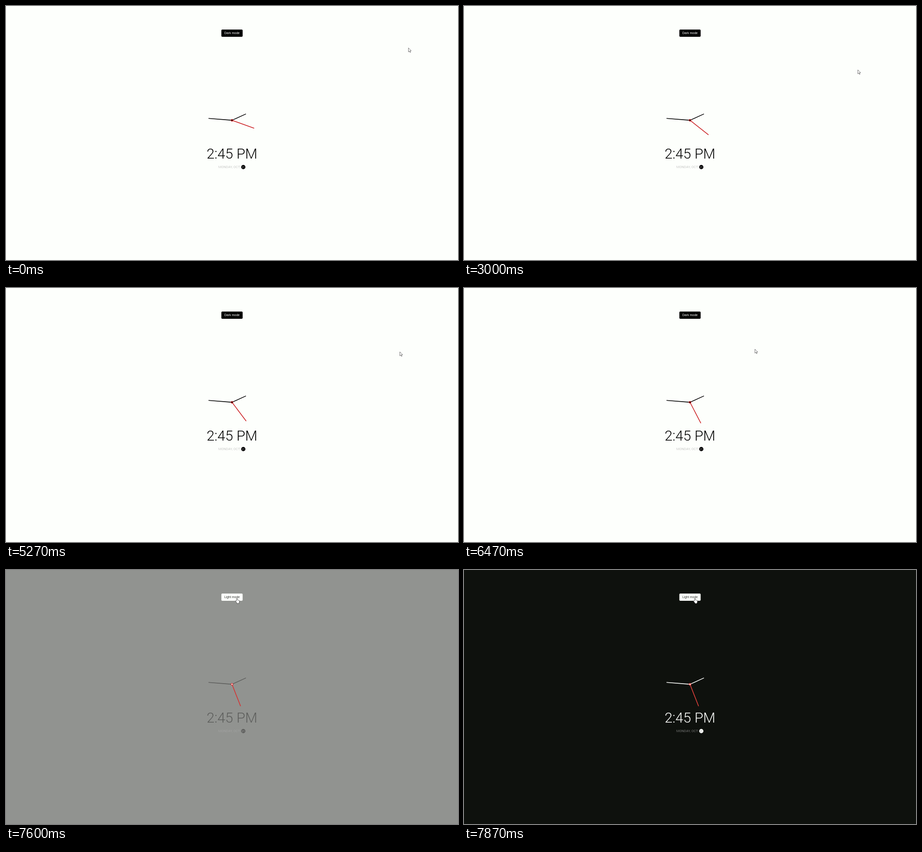
Recreate the animation shown at these times as an HTML page. Size 998 px wide and 561 px high, loop 8000 ms.

```html
<!DOCTYPE html>
<html lang="en">
<head>
<meta charset="utf-8">
<title>Theme clock</title>
<style>
html, body { margin: 0; width: 100%; height: 100%; overflow: hidden; }
svg { display: block; width: 998px; height: 561px; }
text { font-family: Roboto, sans-serif; font-weight: 300; }
#label { font: 6.93px "Liberation Sans", Arial, sans-serif; }
line { stroke-width: 1.56; }
#arrow, #hand { fill: #fff; stroke: #222; stroke-linejoin: round; }
</style>
</head>
<body>
<svg viewBox="0 0 998 561">
  <rect id="page" width="998" height="561"/>
  <rect id="button" x="475.5" y="52" width="47" height="16.1" rx="2.1"/>
  <text id="label" x="499" y="62.3" text-anchor="middle"></text>
  <g transform="translate(499 252.4)">
    <line id="hour" y2="-33.8"/>
    <line id="minute" y2="-52"/>
    <line id="second" y2="-52"/>
    <circle id="hub" r="2.6"/>
    <circle id="pin" r="1.3"/>
  </g>
  <text id="time" x="499" y="337.4" font-size="31.2" text-anchor="middle">2:45 PM</text>
  <text x="469" y="358.3" font-size="7.28" letter-spacing=".156" fill="#aaa">MONDAY, OCT</text>
  <circle id="badge" cx="523.9" cy="355.8" r="4.7"/>
  <text id="day" x="524" y="358" font-size="6.24" letter-spacing=".156" text-anchor="middle">21</text>
  <path id="arrow" stroke-width="1.2" d="M0 0V17L4 13.3 6.8 19.4 9.3 18.3 6.5 12.3H12Z"/>
  <path id="hand" stroke-width="1.3" d="M5 11V2Q5 0 6.7 0T8.4 2V7Q10 6 11.2 7.6 13 6.8 14 8.4 17 8 17 11V15Q17 18 15 20V22H7V20Q4 17 1 12.5 0 10.5 1.6 10 3 9.6 5 12"/>
</svg>
<script>
const $ = id => document.getElementById(id);
const LOOP = 8000, FRAME = 1000 / 15, FADE = 500;
const PAGE_FADE = 7290, INK_FADE = 7325;
const LIGHT = [253, 255, 252], DARK = [14, 17, 13], BLACK = [0, 0, 0];

// Cursor stops: time, x, y, easing used on the way there
const smooth = p => p * p * (3 - 2 * p);
const linear = p => p;
const speedUp = p => p ** 1.5;
const slowDown = p => 1 - (1 - p) ** 2;
const STOPS = [
  [0, 888.6, 92.6, linear],
  [470, 893.5, 94, slowDown],
  [630, 893.5, 94, linear],
  [1300, 869.6, 141, smooth],
  [5880, 869.6, 141, linear],
  [6470, 640.4, 135, speedUp],
  [6730, 560, 95.5, linear],
  [7000, 510, 62.5, slowDown]
];

const clamp = p => Math.min(1, Math.max(0, p));
const mix = (a, b, p) => a + (b - a) * p;
const blend = (a, b, p) => `rgb(${a.map((v, i) => Math.round(mix(v, b[i], p)))})`;

// CSS ease-in: cubic-bezier(.42, 0, 1, 1)
function easeIn(x) {
  x = clamp(x);
  let lo = 0, hi = 1;
  for (let i = 0; i < 20; i++) {
    const s = (lo + hi) / 2, r = 1 - s;
    if (1.26 * s * r * r + 3 * s * s * r + s ** 3 < x) lo = s; else hi = s;
  }
  return 3 * lo * lo * (1 - lo) + lo ** 3;
}

function cursorAt(t) {
  const i = STOPS.findIndex(s => s[0] > t);
  if (i < 0) return STOPS[STOPS.length - 1].slice(1, 3);
  const a = STOPS[i - 1], b = STOPS[i];
  const p = b[3]((t - a[0]) / (b[0] - a[0]));
  return [mix(a[1], b[1], p), mix(a[2], b[2], p)];
}

const paint = (id, color, attr = "fill") => $(id).setAttribute(attr, color);
const turn = (id, deg) => $(id).setAttribute("transform", `rotate(${deg})`);

turn("hour", 2 * 360 / 11);
turn("minute", 45 * 360 / 59);

function draw(t) {
  const page = easeIn((t - PAGE_FADE) / FADE);
  const inkFade = easeIn((t - INK_FADE) / FADE);
  const ink = blend(BLACK, LIGHT, inkFade);
  const red = blend([203, 30, 33], [232, 66, 62], page);
  const dark = t >= PAGE_FADE;

  paint("page", blend(LIGHT, DARK, page));
  paint("button", dark ? "#fdfffc" : "#000");
  paint("label", dark ? "#333" : "#fff");
  $("label").textContent = dark ? "Light mode" : "Dark mode";
  for (const id of ["hour", "minute"]) paint(id, ink, "stroke");
  for (const id of ["time", "badge"]) paint(id, ink);
  paint("second", red, "stroke");
  paint("hub", red);
  paint("pin", dark ? "#fff" : "#000");
  paint("day", blend([255, 255, 255], [100, 100, 100], inkFade));

  // The second hand ticks once per second with a short ease-in
  const tick = Math.floor((t + 35) / 1000);
  const part = easeIn((t + 35 - tick * 1000) / FADE);
  turn("second", (18 + tick + part) * 360 / 59);

  const [x, y] = cursorAt(t);
  const over = x > 475 && x < 523 && y > 52 && y < 68;
  $("arrow").style.display = over ? "none" : "";
  $("hand").style.display = over ? "" : "none";
  $("arrow").setAttribute("transform", `translate(${x} ${y}) scale(.52)`);
  $("hand").setAttribute("transform", `translate(${x - 3.6} ${y}) scale(.52)`);
}

const start = performance.now();
function run() {
  const t = (performance.now() - start) % LOOP;
  draw(Math.floor((t + 4) / FRAME) * FRAME % LOOP);
  requestAnimationFrame(run);
}
run();
</script>
</body>
</html>
```
